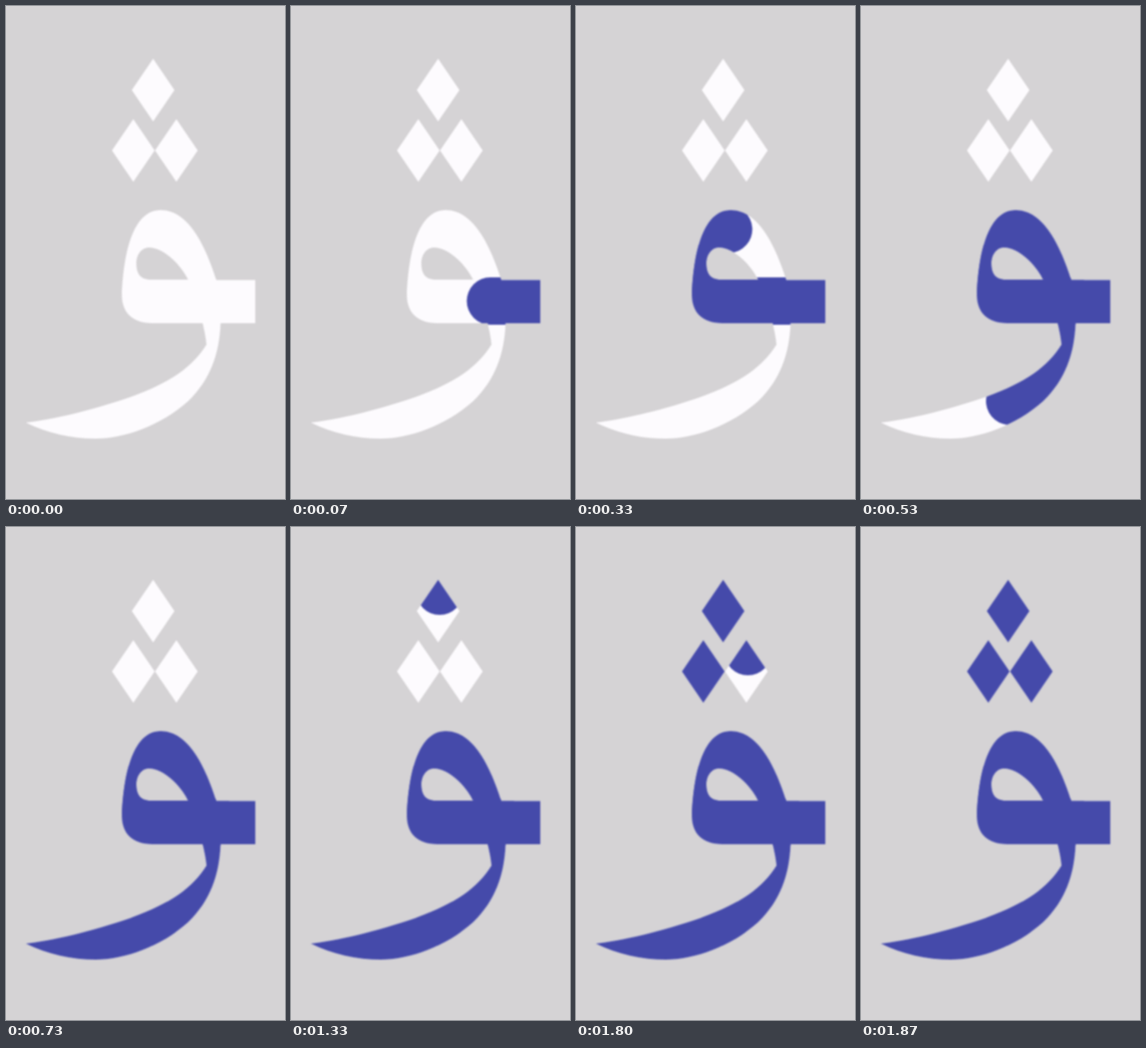
An HTML page without scripts that plays this animation: 366 px wide and 645 px high, repeating every 4000 ms.

```html
<!DOCTYPE html>
<html lang="en">
<head>
<meta charset="utf-8">
<title>Letter stroke order</title>
<style>
  html, body { margin: 0; width: 100%; height: 100%; overflow: hidden; background: #d5d3d5; }
  svg { display: block; width: 100vw; height: 100vh; }
  .soft { filter: blur(1px); }
  .base { fill: #fdfbfe; }

  /* Dash offset: 1.2 is hidden, 1 is the start of the stroke, 0 is complete */
  .ink {
    fill: none; stroke: #454aaa; stroke-width: 62; stroke-linecap: round;
    stroke-dasharray: 1 3; stroke-dashoffset: 1.2;
    animation: 4s step-end infinite;
  }
  .bar { animation-name: bar; }
  .loop { animation-name: loop; }
  .tail { animation-name: tail; }
  .top { animation-name: top; }
  .left { animation-name: left; }
  .right { animation-name: right; }

  @keyframes bar {
    0% { stroke-dashoffset: 1.2; }
    1.625% { stroke-dashoffset: .667; }
    3.25% { stroke-dashoffset: .333; }
    4.95%, 100% { stroke-dashoffset: 0; }
  }
  @keyframes loop {
    0% { stroke-dashoffset: 1.2; }
    5% { stroke-dashoffset: 1; animation-timing-function: steps(5, end); }
    13.25%, 100% { stroke-dashoffset: 0; }
  }
  @keyframes tail {
    0% { stroke-dashoffset: 1.2; }
    13.25% { stroke-dashoffset: 1; animation-timing-function: steps(3, end); }
    18.25%, 100% { stroke-dashoffset: 0; }
  }
  @keyframes top {
    0% { stroke-dashoffset: 1.2; }
    33.25% { stroke-dashoffset: .92; }
    35%, 100% { stroke-dashoffset: 0; }
  }
  @keyframes left {
    0% { stroke-dashoffset: 1.2; }
    38.25%, 100% { stroke-dashoffset: 0; }
  }
  @keyframes right {
    0% { stroke-dashoffset: 1.2; }
    45% { stroke-dashoffset: .92; }
    46.75%, 100% { stroke-dashoffset: 0; }
  }
</style>
</head>
<body>
<svg viewBox="0 0 366 645" preserveAspectRatio="none">
  <defs>
    <path id="letter" clip-rule="evenodd" fill-rule="evenodd" d="
      M327 358.5V415H281.5C280 455 268 489 239 517C203 549 155 566 118 566
      C85 566 55 559 26 545C60 541 110 530 165 511C215 493 245 472 263 443
      C262 432 260 424 258 415H192C165 415 152 400 152 378
      C154 330 164 267 203 267C240 267 262 315 276 358.5Z
      M239 358C228 336 205 316 188 316C177 316 171 326 171 337C171 352 178 358 190 358Z"/>
    <path id="dot" d="M193 69L221 110L193 151L165 110Z"/>
    <clipPath id="inLetter"><use href="#letter"/></clipPath>
    <clipPath id="inDot"><use href="#dot"/></clipPath>
  </defs>

  <g class="soft">
    <use href="#letter" class="base"/>
    <g clip-path="url(#inLetter)">
      <path class="ink bar" pathLength="1" d="M327 386H195C165 386 158 365 160 343"/>
      <path class="ink loop" pathLength="1" d="M160 343C162 310 180 292 203 292C235 292 262 350 268 390C275 440 262 480 195 517"/>
      <path class="ink tail" pathLength="1" d="M195 517C150 538 90 550 30 550"/>
    </g>

    <g>
      <use href="#dot" class="base"/>
      <g clip-path="url(#inDot)"><path class="ink top" pathLength="1" d="M195 80V130"/></g>
    </g>
    <g transform="translate(-26 79)">
      <use href="#dot" class="base"/>
      <g clip-path="url(#inDot)"><path class="ink left" pathLength="1" d="M195 80V130"/></g>
    </g>
    <g transform="translate(30.5 79)">
      <use href="#dot" class="base"/>
      <g clip-path="url(#inDot)"><path class="ink right" pathLength="1" d="M195 80V130"/></g>
    </g>
  </g>
</svg>
</body>
</html>
```
